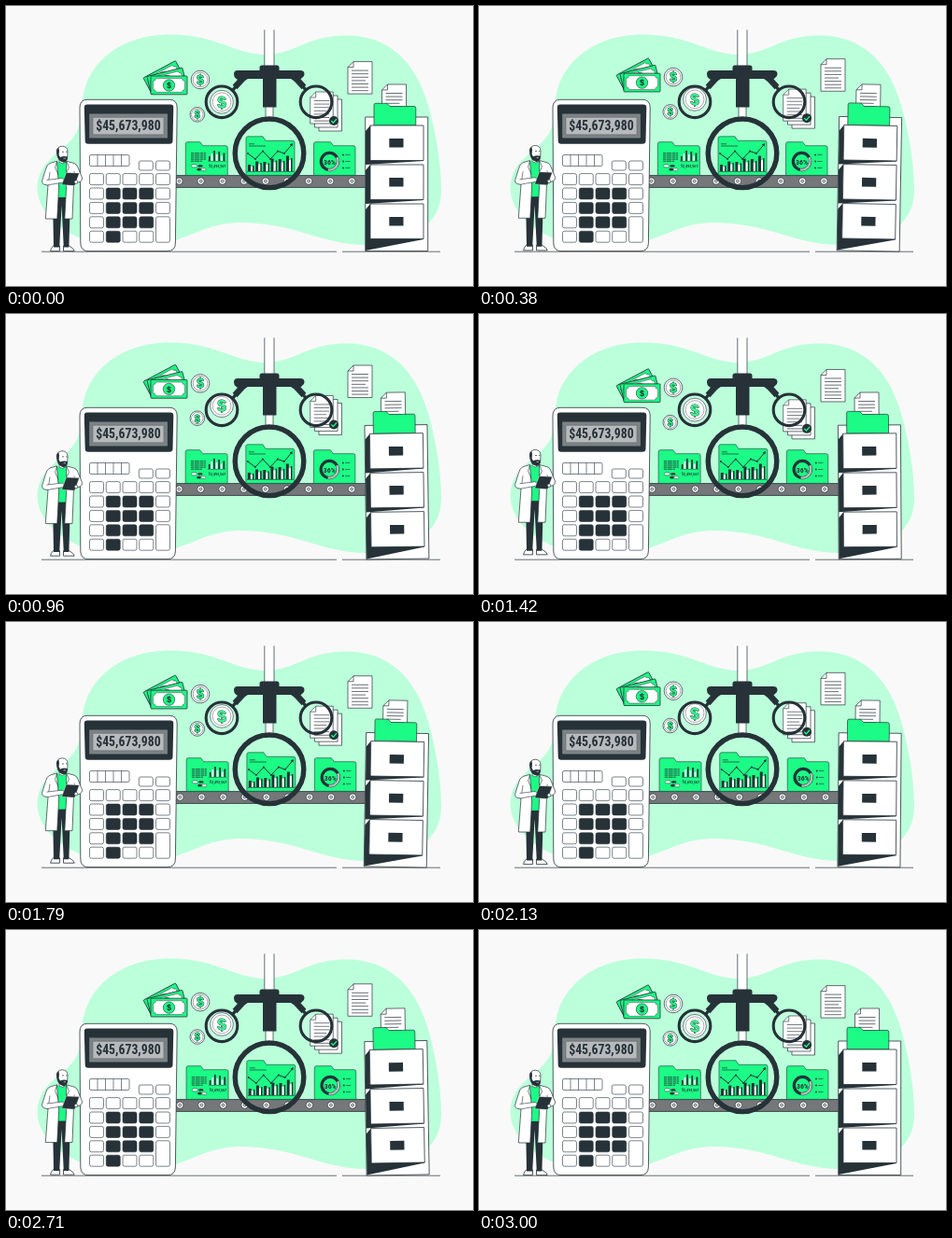
An HTML page with a canvas for the animation above (3040 ms loop, 500 by 300 pixels).

```html
<!DOCTYPE html>
<html lang="en">
<head>
<meta charset="utf-8">
<title>Accounting conveyor</title>
<style>
html, body { margin: 0; width: 100%; height: 100%; overflow: hidden; background: #f9f9f9; }
canvas { display: block; width: 500px; height: 300px; }
</style>
</head>
<body>
<canvas id="stage"></canvas>
<script>
const canvas = document.getElementById('stage');
const c = canvas.getContext('2d');
const dpr = window.devicePixelRatio || 1;
canvas.width = 500 * dpr;
canvas.height = 300 * dpr;

const LOOP = 3040;
const DARK = '#263238', GREEN = '#1cfb85', MINT = '#bbffdb', GREY = '#757779';
const NARROW = '"Roboto Condensed", "Open Sans Condensed", "Noto Sans", "Liberation Sans", sans-serif';
const SANS = '"Liberation Sans", sans-serif';

function paint(fill, stroke, w = 0.8) {
  if (fill) { c.fillStyle = fill; c.fill(); }
  if (stroke) { c.strokeStyle = stroke; c.lineWidth = w; c.stroke(); }
}
function shape(d, fill, stroke, w = 0.8) {
  const p = new Path2D(d);
  if (fill) { c.fillStyle = fill; c.fill(p); }
  if (stroke) { c.strokeStyle = stroke; c.lineWidth = w; c.stroke(p); }
}
function box(x, y, w, h, r, fill, stroke, lw) {
  c.beginPath();
  c.roundRect(x, y, w, h, r);
  paint(fill, stroke, lw);
}
function disc(x, y, r, fill, stroke, lw) {
  c.beginPath();
  c.arc(x, y, r, 0, Math.PI * 2);
  paint(fill, stroke, lw);
}
function line(x1, y1, x2, y2, color = DARK, w = 0.8) {
  c.beginPath();
  c.moveTo(x1, y1);
  c.lineTo(x2, y2);
  paint(null, color, w);
}
function group(dx, dy, draw) {
  c.save();
  c.translate(dx, dy);
  draw();
  c.restore();
}
function turn(x, y, deg, draw) {
  c.save();
  c.translate(x, y);
  c.rotate(deg * Math.PI / 180);
  c.translate(-x, -y);
  draw();
  c.restore();
}
// narrow bold text, centred, at the largest size that fits
function label(text, x, y, width, max) {
  const face = size => `bold extra-condensed ${size}px ${NARROW}`;
  c.font = face(100);
  const size = Math.min(max, 100 * width / c.measureText(text).width);
  c.font = face(size);
  c.fillStyle = DARK;
  c.textAlign = 'center';
  c.textBaseline = 'alphabetic';
  c.fillText(text, x, y + size * 0.356);
}

// motion
const float = (p, h) => -h * (1 - Math.cos(2 * Math.PI * p)) / 2;
const sway = p => Math.sin(2 * Math.PI * p);
const SHAKE = [0, -1, 2, -4, 4, -4, 4, -4, 2, -1, 0];
function shake(p) {
  const i = Math.min(9, Math.floor(p * 10));
  const u = 1 - Math.pow(1 - (p * 10 - i), 1.5);
  return 0.45 * (SHAKE[i] + (SHAKE[i + 1] - SHAKE[i]) * u);
}

function backdrop() {
  c.fillStyle = '#f9f9f9';
  c.fillRect(0, 0, 500, 300);
  shape('M82 104C83 68 116 30.5 176 30.5C224 30.5 246 52 277 52C310 52 322 31.5 364 31.5' +
    'C410 31.5 437 60 450 100C459 128 466 166 466 198C466 236 430 256 386 256C338 256 310 232 249 232' +
    'C206 233 190 258 132 260C76 258 33 228 33.5 194C35 166 58 158 71 142C81 130 80 118 82 104Z', MINT);
  line(38, 263.2, 354, 263.2, DARK, 0.7);
  line(360, 263.2, 465, 263.2, DARK, 0.7);
}

function folder(x, y, w, h, tab, lip) {
  shape(`M${x} ${y + h}V${y + 2}Q${x} ${y} ${x + 2} ${y}H${x + tab - 3}L${x + tab} ${y + lip}` +
    `H${x + w - 2}Q${x + w} ${y + lip} ${x + w} ${y + lip + 2}V${y + h}Z`, GREEN, DARK, 0.6);
}

function reportFolder() {
  folder(192.3, 145.7, 45, 35.7, 18.5, 4);
  c.setLineDash([3.4, 0.6, 5, 0.7]);
  for (let i = 0; i < 5; i++) {
    const y = 157.8 + i * 2.1;
    line(198, y, i === 4 ? 210 : 214, y, DARK, 0.9);
  }
  c.setLineDash([]);
  [5, 8, 11, 7, 10, 5.5, 8.5].forEach((h, i) => {
    c.fillStyle = i % 2 ? '#fff' : DARK;
    c.fillRect(217 + i * 2.6, 166 - h, 1.7, h);
  });
  line(216, 166.3, 235.5, 166.3, DARK, 0.5);
  box(198.5, 170, 6, 2.8, 1.4, '#fff', DARK, 0.5);
  box(205.5, 170.2, 5, 2.4, 1.2, DARK);
  box(204.5, 173.8, 4.5, 2.8, 1.4, DARK);
  box(209, 173.8, 5, 2.8, 1.4, '#fff', DARK, 0.5);
  label('$2,493,567', 226.2, 171.2, 18.5, 5);
}

function chartFolder() {
  folder(257, 139.8, 52, 41.6, 21, 4.5);
  line(260, 147.8, 266, 147.8, DARK, 0.7);
  line(260, 150, 278, 150, DARK, 0.7);
  for (let i = 0; i < 6; i++) {
    const x = 259 + i * 8.2;
    const h = 7 + i * 1.5 + (i % 2) * 2;
    c.fillStyle = DARK;
    c.fillRect(x, 177 - h, 3, h);
    c.fillRect(x + 5, 177 - h * 0.85, 1.6, h * 0.85);
    c.fillStyle = '#fff';
    c.fillRect(x + 3, 177 - h * 0.72, 2, h * 0.72);
  }
  line(258, 177.3, 308, 177.3, DARK, 0.7);
  const points = [[259, 158], [267, 164], [275, 155.5], [283, 164], [291, 155.5], [298, 158]];
  shape('M' + points.join('L') + 'L306 148.5', null, DARK, 1);
  shape('M303.8 148.4L307 147L306.5 150.6Z', DARK);
  for (const [x, y] of points) disc(x, y, 0.9, DARK);
}

function shareFolder() {
  folder(329.5, 145.7, 44.5, 35.7, 21, 4);
  disc(346.4, 166.5, 9.1, null, DARK, 3.2);
  c.beginPath();
  c.arc(346.4, 166.5, 9.1, -0.5, 1.75);
  paint(null, '#b9bfc1', 2.4);
  label('36%', 346.4, 166.8, 13, 8);
  for (let i = 0; i < 3; i++) {
    const y = 159.5 + i * 7;
    disc(361, y, 0.9, DARK);
    line(363.2, y, 368.5, y, DARK, 0.6);
  }
}

function conveyor() {
  box(176, 181.6, 212, 12.8, 0, GREY, DARK, 0.8);
  for (let i = 0; i < 9; i++) {
    const x = 185.5 + i * 23.1;
    disc(x, 187.6, 3.7, '#fff', DARK, 0.7);
    disc(x, 187.6, 1.5, '#c5cacb', DARK, 0.6);
  }
  reportFolder();
  chartFolder();
  shareFolder();
}

function dollar(x, y, size, fill, edge) {
  c.font = `bold ${size}px ${SANS}`;
  c.textAlign = 'center';
  c.textBaseline = 'alphabetic';
  c.lineWidth = edge;
  c.strokeStyle = DARK;
  c.fillStyle = fill;
  c.strokeText('$', x, y + size * 0.35);
  c.fillText('$', x, y + size * 0.35);
}

function coin(x, y, r) {
  disc(x, y, r, '#fff', DARK, 0.7);
  disc(x, y, r * 0.8, null, DARK, 0.45);
  dollar(x, y, r * 1.4, GREEN, 0.9);
}

function bill() {
  box(155, 75, 39, 19.8, 0.8, GREEN, DARK, 0.8);
  shape('M160.5 77.6H188.5Q188.8 80.2 191.5 80.5V89.3Q188.8 89.6 188.5 92.3H160.5Q160.2 89.6 157.5 89.3V80.5' +
    'Q160.2 80.2 160.5 77.6Z', '#fff', DARK, 0.45);
  disc(174.5, 85, 6.2, GREEN, DARK, 0.6);
  dollar(174.5, 85, 9, DARK, 0.1);
}

function money() {
  for (const a of [-28, -14, 0]) turn(155, 92, a, bill);
  coin(208, 79, 9.8);
  coin(204.8, 116.3, 7.8);
}

function sheet(x, y, w, h, rows) {
  const f = 6;
  shape(`M${x + f} ${y}H${x + w}V${y + h}H${x}V${y + f}Z`, '#fff', DARK, 0.7);
  shape(`M${x + f} ${y}V${y + f}H${x}`, null, DARK, 0.7);
  for (let i = 0; i < rows; i++) {
    const ly = y + 9.5 + i * 3.6;
    line(x + 4, ly, x + w - (i % 4 === 3 ? 7 : 4), ly, DARK, 0.7);
  }
}

function stack() {
  sheet(335, 100, 24.5, 34, 0);
  sheet(330.5, 96, 24.5, 34, 0);
  sheet(325.7, 92, 24.5, 34, 7);
  disc(351, 123, 5, DARK);
  shape('M348.3 123L350.4 125.2L354 121', null, GREEN, 1.3);
}

function claw() {
  box(276.8, 25.5, 10.2, 42, 0, '#fff');
  line(276.8, 25.5, 276.8, 66, DARK, 0.7);
  line(287, 25.5, 287, 66, DARK, 0.7);
  box(278, 106, 8, 15, 0, '#fff', DARK, 0.7);

  for (const [side, x] of [[-1, 231], [1, 332]]) {
    line(282 + side * 26, 75, 282 + side * 37, 87, DARK, 6.5);
    line(282 + side * 35, 85, 282 + side * 39, 90, DARK, 3.5);
    disc(x, 102.8, 16.8, 'rgba(255,255,255,0.1)', DARK, 3.1);
  }
  shape('M248 69H271.5V66Q271.5 63.5 274 63.5H290Q292.5 63.5 292.5 66V69H315Q319.5 69 319.5 73' +
    'Q319.5 75.5 317 77L311 82L305 78H289.5V108.5H275V78H259L252 82L246 77.5Q244 76 244 73Q244 69 248 69Z', DARK);
  disc(282, 157.8, 36.8, null, DARK, 5.4);
}

function key(x, y, h = 12, dark = false) {
  box(x, y, 15, h, 2, dark ? DARK : '#fff', DARK, 0.6);
}

function calculator() {
  shape('M87 100.3H175Q183.2 100.3 183.2 109L181.4 254Q181.2 262.6 173 262.6H88Q80 262.6 79.8 254L79 109' +
    'Q79 100.3 87 100.3Z', '#fff', DARK, 0.8);
  shape('M87 105.6H176Q179.5 105.6 179.3 109L178.5 144.8Q178.4 147.8 175 147.8H88Q84.8 147.8 84.7 144.8' +
    'L83.8 109Q83.6 105.6 87 105.6Z', DARK);
  box(89.2, 115.6, 83.7, 26, 0, '#7d8285');
  box(93, 119.3, 76, 18.5, 0, '#b7babc', '#565e62', 0.5);
  label('$45,673,980', 130.9, 128.4, 69.5, 16);

  box(89.5, 159.5, 42.5, 12, 1.5, '#fff', DARK, 0.6);
  for (let i = 1; i < 5; i++) line(89.5 + i * 8.5, 159.5, 89.5 + i * 8.5, 171.5, DARK, 0.6);
  key(142.3, 166, 10);
  key(160.5, 166, 10);
  for (let r = 0; r < 5; r++) {
    for (let k = 0; k < 5; k++) {
      if (r === 4 && k === 4) continue;
      const dark = (r > 0 && r < 4 && k > 0 && k < 4) || (r === 4 && k === 1);
      key(89.5 + k * 17.75, 179.6 + r * 15.4, r === 3 && k === 4 ? 27.4 : 12, dark);
    }
  }
}

function cabinet() {
  sheet(402.5, 84, 26, 34, 6);
  box(384.7, 119, 67, 143.5, 0, '#fff', DARK, 0.8);
  shape('M394 128V106Q394 104.3 395.7 104.3H408L411 107.5H437Q438.8 107.5 438.8 109.3V128Z', GREEN, DARK, 0.7);
  [128, 170, 212].forEach((y, i) => {
    shape(`M385 ${y + 6}L390 ${y}V${y + 36}H447V${y + 38}L385 ${y + (i === 2 ? 50 : 42)}Z`, DARK);
    box(390, y, 57, 37.5, 0, '#fff', DARK, 0.8);
    box(410.3, y + 14, 15.2, 9.6, 0, DARK);
  });
}

function man() {
  // shoes and trousers
  shape('M50.5 257H57.5V262.6H47.6Q47.8 260 50.5 257Z', '#fff', DARK, 0.8);
  shape('M61.5 257H67.5Q73 260 73.2 262.6H61.5Z', '#fff', DARK, 0.8);
  shape('M50 202H69L67.4 258.5H61.8L59.6 214L57.2 258.5H51Z', DARK);
  // shirt and coat
  shape('M54 167H65.5V205H54Z', GREEN);
  shape('M54.5 166.3L47 168.5Q43.5 170 42.5 175L38.6 187.5Q38.2 190 40.8 191.3L45 192L42.3 228H54.8L56.6 194Z', '#fff', DARK, 0.7);
  shape('M64.7 166.3L73 168.5Q76 169.5 77 173L81.5 184Q82 187 79 188.5L72.5 190.5L71 228H62.8L64.6 194Z', '#fff', DARK, 0.7);
  shape('M47 178L45 192M73 177L74 184', null, DARK, 0.6);
  shape('M54.5 166.3L52.6 173L56 181M64.7 166.3L67.5 173L64.5 179', null, DARK, 0.6);
  shape('M43.5 186.5L60 184.5L62.5 186.2L61 189L44 192', '#fff', DARK, 0.6);
  // clipboard
  shape('M64.5 178.4L78.5 179L73.6 192.6L59.6 191.6Z', DARK, '#fff', 0.4);
  disc(75, 188.5, 1.8, '#fff', DARK, 0.6);
  // head
  shape('M57 160H63.8V167.5Q60.5 170 57 167.5Z', '#fff', DARK, 0.6);
  shape('M54.3 155.5Q55 150.4 60.2 150.2Q65.8 150.4 66 156L65.7 162Q64.6 166.4 61 166.4Q56 165.5 54.8 160Z', '#fff', DARK, 0.7);
  shape('M54.2 157Q53.8 153 56.4 151.8L57 155L56.6 159.4L58 162Q61.6 160.2 66 161.5' +
    'L65.6 164.8Q64.3 168 61.3 167.6Q56.6 166.5 55.3 162Z', DARK);
  line(60, 156.4, 62, 156.2, DARK, 0.7);
  line(64, 156.2, 65.6, 156.4, DARK, 0.7);
  line(61.6, 163.2, 64, 163.2, '#fff', 0.6);
}

function draw(now) {
  const t = now % LOOP;
  const p = (t % 1500) / 1500;
  const q = (t % 3000) / 3000;

  c.setTransform(dpr, 0, 0, dpr, 0, 0);
  c.lineJoin = 'round';
  backdrop();
  group(shake(p), 0, conveyor);
  group(0, float(p, 5.6), () => {
    money();
    coin(231, 102.8, 12.4);
    stack();
    sheet(366, 59.6, 26, 34.5, 7);
  });
  claw();
  calculator();
  turn(418, 173, sway(p), cabinet);
  group(0, float(q, 4.8), man);
}

const start = performance.now();
function frame(now) {
  draw(Math.max(0, now - start));
  requestAnimationFrame(frame);
}
draw(0);
requestAnimationFrame(frame);
</script>
</body>
</html>
```
